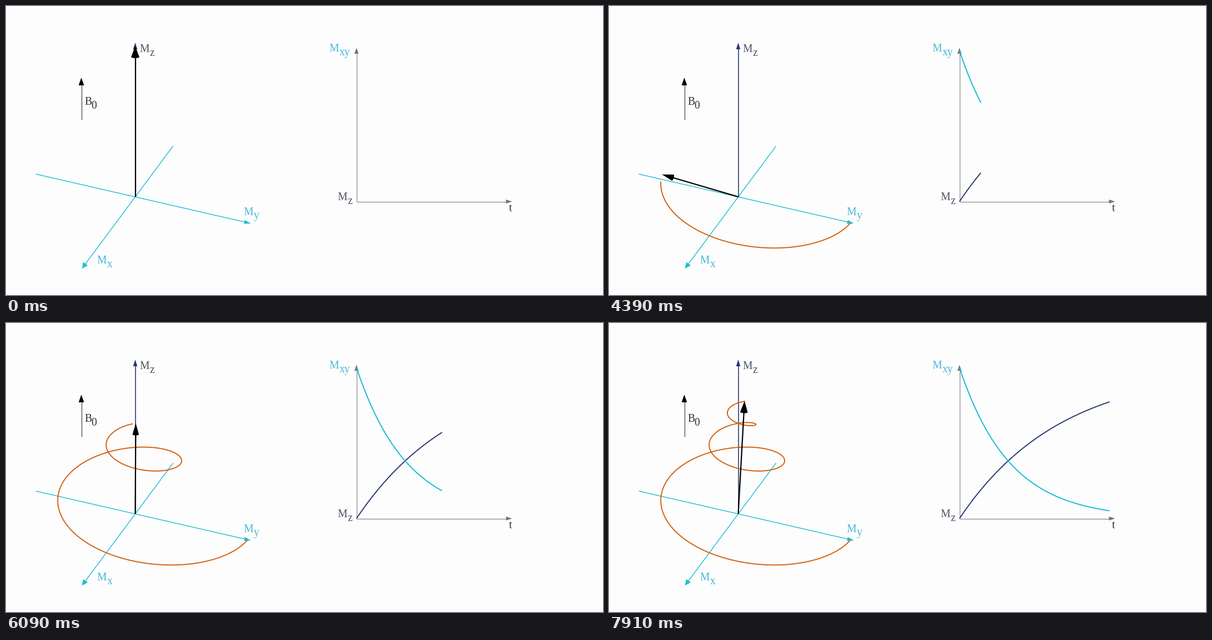
A matplotlib script that plays this animation: 1074 by 521 pixels, repeating every 8000 ms.

```python
import numpy as np
import matplotlib.pyplot as plt
from matplotlib.animation import FuncAnimation
from matplotlib.patches import Polygon

W, H, DPI = 1074, 521, 64
PT = 72 / DPI
STEP_MS, LOOP_MS = 20, 8000

CYAN, NAVY, ORANGE = "#1fbcd6", "#26376f", "#d2600f"
GREY, BLACK = "#747474", "#000000"
CYAN_TEXT, MZ_TEXT, DARK_TEXT = "#48b9d8", "#505068", "#303030"

ORIGIN = np.array([232.0, 343.5])
PLOT_X, PLOT_Y, PLOT_H = 630, 352, 272
K_XY, K_Z = 0.011, 0.0055      # decay and recovery per pixel along t
OMEGA = 0.069                  # precession in radians per pixel along t
PULSE_MS = 3830
TRAIL_LAG = 2.0

fig = plt.figure(figsize=(W / DPI, H / DPI), dpi=DPI, facecolor="#fdfdfd")
ax = fig.add_axes([0, 0, 1, 1])
ax.set_xlim(-0.5, W - 0.5)
ax.set_ylim(H - 0.5, -0.5)
ax.axis("off")


def line(xs, ys, color, width, z):
    return ax.plot(xs, ys, color=color, lw=width * PT, zorder=z,
                   solid_capstyle="butt")[0]


def head_shape(tip, toward, length, half, bulge=0.0):
    """Arrowhead outline with an optionally rounded base."""
    tip, toward = np.asarray(tip, float), np.asarray(toward, float)
    d = toward / np.hypot(*toward)
    n = np.array([-d[1], d[0]])
    a = np.linspace(0, np.pi, 13)[:, None]
    base = tip - d * (length + bulge * np.sin(a)) + n * half * np.cos(a)
    return np.vstack([tip, base])


def head(tip, toward, length, half, color, z, bulge=0.0):
    patch = Polygon(head_shape(tip, toward, length, half, bulge),
                    fc=color, ec="none", zorder=z)
    return ax.add_patch(patch)


def arrow(start, tip, color, width, length, half, z):
    start, tip = np.array(start, float), np.array(tip, float)
    d = tip - start
    end = tip - d / np.hypot(*d) * (length - 1)
    line([start[0], end[0]], [start[1], end[1]], color, width, z)
    head(tip, d, length, half, color, z)


def label(x, y, main, sub, color, sub_x=0):
    style = dict(family="Liberation Serif", color=color, va="baseline",
                 ha="left", zorder=5)
    ax.text(x, y, main, fontsize=19.5 * PT, **style)
    if sub:
        ax.text(x + sub_x, y + 6.5, sub, fontsize=19.5 * PT, **style)


def magnetisation(s):
    """Screen position and depth of the vector tip, s pixels after the pulse."""
    r, z = np.exp(-K_XY * s), 1 - np.exp(-K_Z * s)
    return project(r * np.cos(OMEGA * s), r * np.sin(OMEGA * s), z)


def project(my, mx, mz):
    depth = 1 - 0.07 * my - 0.165 * mx - 0.12 * mz
    x = ORIGIN[0] + (187.8 * my - 78 * mx) / depth
    y = ORIGIN[1] + (43.9 * my + 104 * mx - 239.4 * mz) / depth
    return x, y, depth


def elapsed(ms):
    """Distance along t; pictures advance in a 20, 20, 100 ms rhythm."""
    cycle, rest = divmod(ms - PULSE_MS + 20, 140)
    n = 3 * cycle + min(rest // 20, 2)
    return float(np.interp(n, [1, 26, 50, 72, 89], [1, 79, 154, 220, 270]))


# Rotating-vector diagram
arrow((53, 302.5), (440, 391.5), CYAN, 1.4, 12, 3.6, 2)
arrow((300, 252), (136, 473), CYAN, 1.4, 11, 5, 2)
arrow(ORIGIN, (232, 65.5), NAVY, 1.6, 12, 3.8, 2)
arrow((135, 204), (135, 129), "#4a4a4a", 1.3, 13, 4.5, 2)
head((135, 129), (0, -1), 13.5, 4.8, BLACK, 3)

# Time plot
arrow((PLOT_X, PLOT_Y), (PLOT_X, 75), GREY, 1, 10.5, 3.8, 2)
arrow((PLOT_X, PLOT_Y), (910, PLOT_Y), GREY, 1, 11, 3.5, 2)

label(239.5, 82.5, "M", "z", MZ_TEXT, 18.5)
label(140.5, 178, "B", "0", DARK_TEXT, 12)
label(426.5, 376.5, "M", "y", CYAN_TEXT, 18.5)
label(162.5, 464, "M", "x", CYAN_TEXT, 18.5)
label(580.5, 82, "M", "xy", CYAN_TEXT, 18.5)
label(595.5, 350, "M", "z", MZ_TEXT, 18.5)
label(904, 370, "t", "", DARK_TEXT)

trail = line([], [], ORANGE, 1.9, 3)
rise = line([], [], NAVY, 1.9, 3)
decay = line([], [], CYAN, 2, 4)
shaft = line([], [], BLACK, 2.2, 6)
tip_head = head((232, 72), (0, -1), 21, 7.5, BLACK, 6, 2)


def set_vector(x, y, depth):
    tip = np.array([x, y])
    d = tip - ORIGIN
    end = tip - d / np.hypot(*d) * 18
    shaft.set_data([ORIGIN[0], end[0]], [ORIGIN[1], end[1]])
    half = 7.3 * (0.88 / depth) ** 2.7
    tip_head.set_xy(head_shape(tip, d, 20, half, 2))


def update(i):
    ms = i * STEP_MS + STEP_MS // 2
    if ms < PULSE_MS:
        for curve in (trail, rise, decay):
            curve.set_data([], [])
        set_vector(*project(0, 0, 1))
    else:
        now = elapsed(ms)
        s = np.linspace(0, now, 160)
        decay.set_data(PLOT_X + s, PLOT_Y - PLOT_H * np.exp(-K_XY * s))
        rise.set_data(PLOT_X + s, PLOT_Y - PLOT_H * (1 - np.exp(-K_Z * s)))
        x, y, _ = magnetisation(np.linspace(0, max(now - TRAIL_LAG, 0), 240))
        trail.set_data(x, y)
        set_vector(*magnetisation(now))
    return trail, rise, decay, shaft, tip_head


def init():
    return update(0)


anim = FuncAnimation(fig, update, frames=LOOP_MS // STEP_MS, init_func=init,
                     interval=STEP_MS, repeat=True, repeat_delay=0, blit=False)
plt.show()
```
